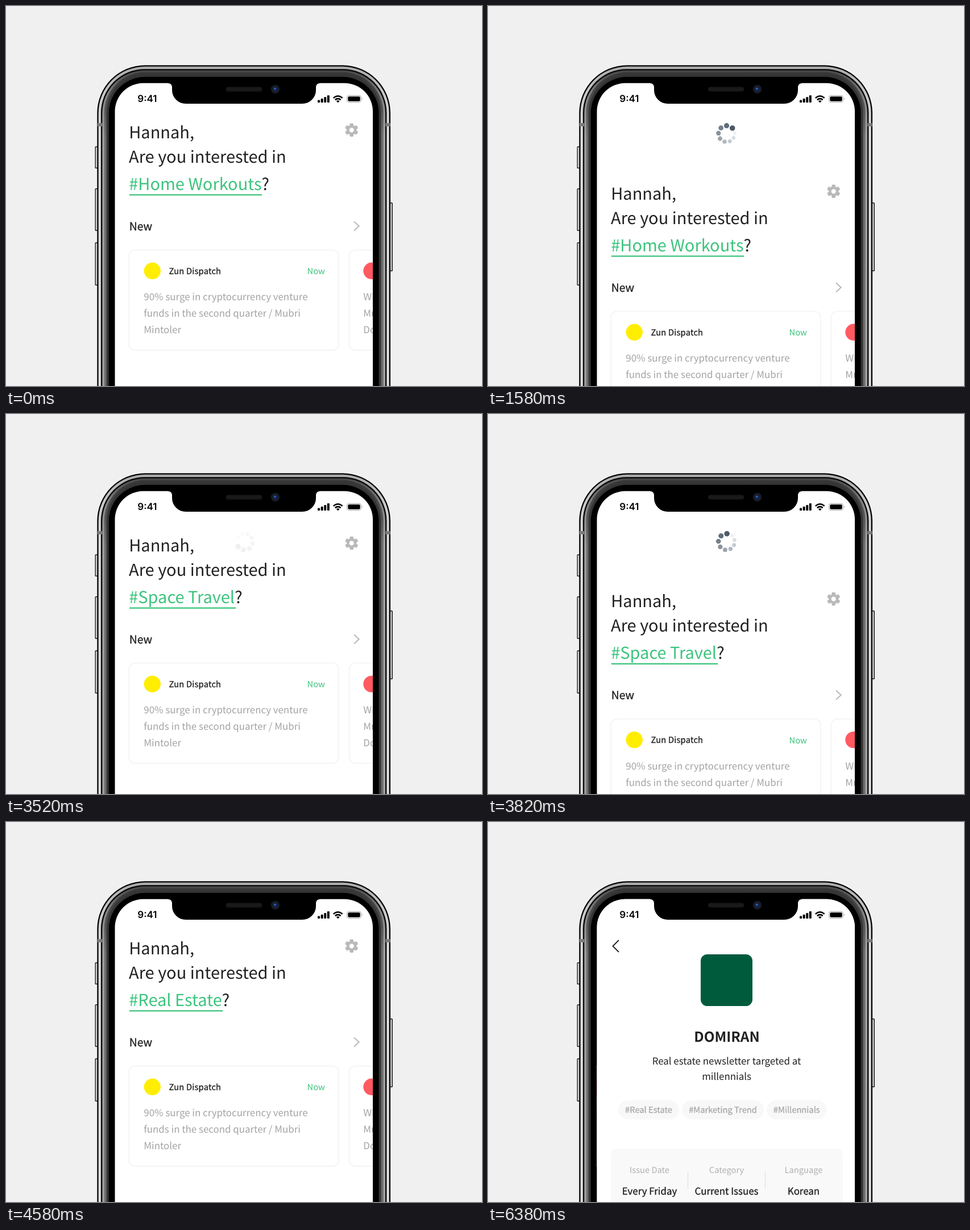
Animation of 837x669 px, one loop 7.82 s. Source, as an HTML page:

```html
<!DOCTYPE html>
<html lang="en">
<head>
<meta charset="utf-8">
<title>Newsletter app</title>
<style>
  html, body { margin: 0; width: 100%; height: 100%; overflow: hidden; background: #f0f0f0; }
  svg { display: block; }
  text {
    font-family: "Noto Sans CJK KR", "Noto Sans CJK JP", "Noto Sans CJK SC", "Noto Sans CJK", "Noto Sans", sans-serif;
    fill: #212121; white-space: pre; text-rendering: geometricPrecision;
  }
  .head { font-size: 29px; }
  .body { font-size: 16.9px; }
  .small { font-size: 14.7px; }
  .mid { stroke: #212121; stroke-width: .35px; }
  .grey { fill: #a4a4a8; }
  .pale { fill: #b0b0b3; }
  .chip { fill: #a8a8ab; stroke: #a8a8ab; stroke-width: .3px; }
  .green { fill: #3cc47d; }
  .center { text-anchor: middle; }
  .clock { font: 600 17px Inter, sans-serif; fill: #000; }
  .card { fill: #fff; stroke: #f5f5f6; stroke-width: 2px; }
  .line { fill: none; stroke-width: 2px; }
</style>
</head>
<body>
<svg width="837" height="669" viewBox="0 0 837 669">
  <defs>
    <linearGradient id="silver" gradientUnits="userSpaceOnUse" x1="0" y1="104" x2="0" y2="230">
      <stop offset="0" stop-color="#a8a8a8"/><stop offset=".4" stop-color="#c8c8c8"/><stop offset="1" stop-color="#dedede"/>
    </linearGradient>
    <linearGradient id="steel" gradientUnits="userSpaceOnUse" x1="0" y1="112" x2="0" y2="230">
      <stop offset="0" stop-color="#444"/><stop offset=".35" stop-color="#808080"/><stop offset="1" stop-color="#a0a0a0"/>
    </linearGradient>
    <linearGradient id="shade" gradientUnits="userSpaceOnUse" x1="0" y1="112" x2="0" y2="230">
      <stop offset="0" stop-color="#333"/><stop offset="1" stop-color="#6c6c6c"/>
    </linearGradient>
    <clipPath id="screen"><rect x="191.5" y="135.700" width="453.500" height="640" rx="50"/></clipPath>
  </defs>

  <rect width="837" height="669" fill="#f0f0f0"/>
  <g id="buttons"></g>
  <g id="shell"></g>
  <g fill="#7d7d7d">
    <rect x="161" y="206" width="8" height="6"/>
    <rect x="667.500" y="206" width="8" height="6"/>
  </g>

  <g clip-path="url(#screen)">
    <rect x="190" y="135" width="456" height="540" fill="#fff"/>
    <g id="spinner"></g>

    <g id="home">
      <text class="head" x="216.200" y="232.500">Hannah,</text>
      <text class="head" x="216" y="275.500">Are you interested in</text>
      <g id="topics"></g>
      <g id="gear" transform="translate(607.700 218.300)" fill="#b9b9bb">
        <circle r="6.300" fill="none" stroke="#b9b9bb" stroke-width="4.400"/>
      </g>
      <text class="mid" x="216.700" y="394.500" font-size="19.400">New</text>
      <path class="line" stroke="#b9b9bb" d="M612 379.500l8.700 8-8.700 8"/>

      <rect class="card" x="216" y="429.500" width="369" height="176.500" rx="11"/>
      <circle cx="257.300" cy="466.300" r="14.700" fill="#ffee00"/>
      <text class="small mid" x="286.500" y="471.800" letter-spacing=".2">Zun Dispatch</text>
      <text class="small green" x="560.800" y="472.300" text-anchor="end">Now</text>
      <g id="story"></g>

      <rect class="card" x="603.500" y="429.500" width="369" height="176.500" rx="11"/>
      <circle cx="643" cy="466.300" r="14.700" fill="#ff5a62"/>
      <g id="nextStory"></g>
    </g>

    <g id="detail">
      <rect x="191.500" y="135" width="453.500" height="540" fill="#fff"/>
      <path class="line" stroke="#2a2a2a" d="M230 208l-10.500 10.500L230 229"/>
      <rect x="374" y="233" width="91" height="91" rx="11.500" fill="#005b3c"/>
      <text class="center" x="420" y="387" font-size="24.400" font-weight="700">DOMIRAN</text>
      <text class="body center" x="419.500" y="427.300">Real estate newsletter targeted at</text>
      <text class="body center" x="419.500" y="453.500">millennials</text>
      <g id="chips"></g>
      <rect x="216" y="575" width="408" height="140" rx="10" fill="#f9f9f9"/>
      <path d="M351.500 616v30M487.500 616v30" stroke="#dcdcdc"/>
      <g id="facts"></g>
    </g>
  </g>

  <path d="M285 135v1q7 0 7 8v4a24 24 0 0 0 24 24h205a24 24 0 0 0 24-24v-4q0-8 7-8v-1z"/>
  <rect x="387" y="142.500" width="63" height="8" rx="4" fill="#191919"/>
  <circle cx="473.500" cy="146.500" r="7.800" fill="#171a22"/>
  <circle cx="473.500" cy="146.500" r="4.300" fill="#14264f"/>
  <circle cx="472.800" cy="145.500" r="1.700" fill="#3565b5"/>

  <text class="clock" x="231.300" y="169.200">9:41</text>
  <g id="bars"></g>
  <g fill="none" stroke="#000" stroke-width="2.600">
    <path d="M575.800 162q7.900-7 15.800 0"/>
    <path d="M578.800 165.300q4.900-4.200 9.800 0"/>
  </g>
  <path d="M583.700 170.300l-2.900-3q2.900-2.200 5.800 0z"/>
  <rect x="599.500" y="157.500" width="25" height="12" rx="3.600" fill="none" stroke="#a5a5a5"/>
  <rect x="601.300" y="159.300" width="21.400" height="8.400" rx="2"/>
  <path d="M626 161.500q2 2 0 4z" fill="#a5a5a5"/>
</svg>

<script>
const LOOP = 7820, PULL = 108, SCREEN = 453.5;
const el = id => document.getElementById(id);

function add(parent, tag, attrs, content = '') {
  const node = document.createElementNS('http://www.w3.org/2000/svg', tag);
  for (const key in attrs) node.setAttribute(key, attrs[key]);
  node.textContent = content;
  return parent.appendChild(node);
}

// Phone body: nested rounded outlines, from the edge inwards
[[0, '#000'], [2.3, 'url(#silver)'], [6.6, '#080808'], [9, 'url(#steel)'],
 [12.5, 'url(#shade)'], [16.5, '#353535'], [20.5, '#000']].forEach(([inset, fill]) =>
  add(el('shell'), 'rect', {
    x: 160.3 + inset, y: 104.3 + inset, width: 515.7 - 2 * inset, height: 700,
    rx: 84 - inset, fill
  }));

[[156.5, 247, 39], [156.5, 321, 75], [156.5, 416, 76], [674, 346, 121]].forEach(([x, y, height]) => {
  add(el('buttons'), 'rect', { x, y, width: 6, height, rx: 1.5, fill: '#1c1c1c' });
  add(el('buttons'), 'rect', { x: x + 1.3, y: y + 1.5, width: 3.2, height: height - 3, fill: '#d4d4d4' });
});

[4.5, 7, 9.7, 12.8].forEach((height, i) =>
  add(el('bars'), 'rect', { x: 548 + 5.6 * i, y: 170 - height, width: 4, height, rx: 1 }));

for (let i = 0; i < 6; i++)
  add(el('gear'), 'path', { d: 'M-3.700-7.500L-2.700-11.700H2.700L3.700-7.500z', transform: `rotate(${60 * i})` });

function lines(parent, x, list) {
  list.forEach((s, i) => add(parent, 'text', { class: 'body grey', x, y: 518.3 + 29 * i }, s));
}
lines(el('story'), 242.3, ['90% surge in cryptocurrency venture', 'funds in the second quarter / Mubri', 'Mintoler']);
lines(el('nextStory'), 628.3, ['What', 'Music', 'Does']);

const topics = [['#Home Workouts', 450], ['#Space Travel', 404], ['#Real Estate', 381]].map(([name, end]) => {
  const group = add(el('topics'), 'g', {});
  const text = add(group, 'text', { class: 'head', x: 216.2, y: 323.8 });
  const tag = add(text, 'tspan', { class: 'green' }, name);
  add(text, 'tspan', {}, '?');
  const rule = add(group, 'rect', { class: 'green', x: 217, y: 331.3, width: end - 217, height: 2.3 });
  return { group, tag, rule };
});

[['#Real Estate', 229, 336], ['#Marketing Trend', 341, 485], ['#Millennials', 490, 595.5]].forEach(([name, x, end]) => {
  add(el('chips'), 'rect', { x, y: 490, width: end - x, height: 33.5, rx: 16.7, fill: '#f8f8f8' });
  add(el('chips'), 'text', { class: 'small chip center', x: (x + end) / 2, y: 512 }, name);
});

[['Issue Date', 'Every Friday', 284], ['Category', 'Current Issues', 419.5], ['Language', 'Korean', 555]].forEach(([label, value, x]) => {
  add(el('facts'), 'text', { class: 'small pale center', x, y: 618.2 }, label);
  add(el('facts'), 'text', { class: 'body mid center', x, y: 656.3 }, value);
});

// Spinner: head is large and dark, the tail shrinks and fades
for (let i = 0; i < 9; i++) {
  const angle = -(i * 46 - i * i * .75) * Math.PI / 180;
  const mix = (a, b) => Math.round(a + (b - a) * i / 8);
  add(el('spinner'), 'circle', {
    cx: 14.3 * Math.cos(angle), cy: 14.3 * Math.sin(angle), r: 4.8 - i * .22,
    fill: `rgb(${mix(76, 236)},${mix(90, 240)},${mix(102, 244)})`
  });
}

const progress = (t, from, to) => Math.min(1, Math.max(0, (t - from) / (to - from)));
const easeOut = p => 1 - (1 - p) ** 3;

const refreshes = [
  { start: 1170, back: 1910, end: 2280 },
  { start: 3510, back: 4210, end: 4580 }
];

function draw(t) {
  let pulled = 0, topic = 0, sinceStart = 0;
  for (const { start, back, end } of refreshes) {
    const returned = easeOut(progress(t, back, end));
    pulled += easeOut(progress(t, start, start + 380)) - returned;
    topic += returned;
    if (t >= start) sinceStart = t - start;
  }
  const slide = easeOut(progress(t, 5940, 6380));
  const press = progress(t, 5800, 5860) - progress(t, 5880, 5960);

  el('home').setAttribute('transform', `translate(${-SCREEN * slide} ${PULL * pulled})`);
  el('detail').setAttribute('transform', `translate(${SCREEN * (1 - slide)} 0)`);
  el('spinner').setAttribute('transform', `translate(419.5 225) rotate(${.43 * (sinceStart - 410) - 45})`);
  el('spinner').setAttribute('opacity', pulled);

  topics.forEach(({ group, tag, rule }, i) => {
    group.setAttribute('opacity', Math.max(0, 1 - Math.abs(topic - i)));
    tag.setAttribute('fill-opacity', 1 - .55 * press);
    rule.setAttribute('fill-opacity', 1 - .55 * press);
  });
}

const begin = performance.now();
function tick() {
  draw((performance.now() - begin) % LOOP);
  requestAnimationFrame(tick);
}
tick();
</script>
</body>
</html>
```
